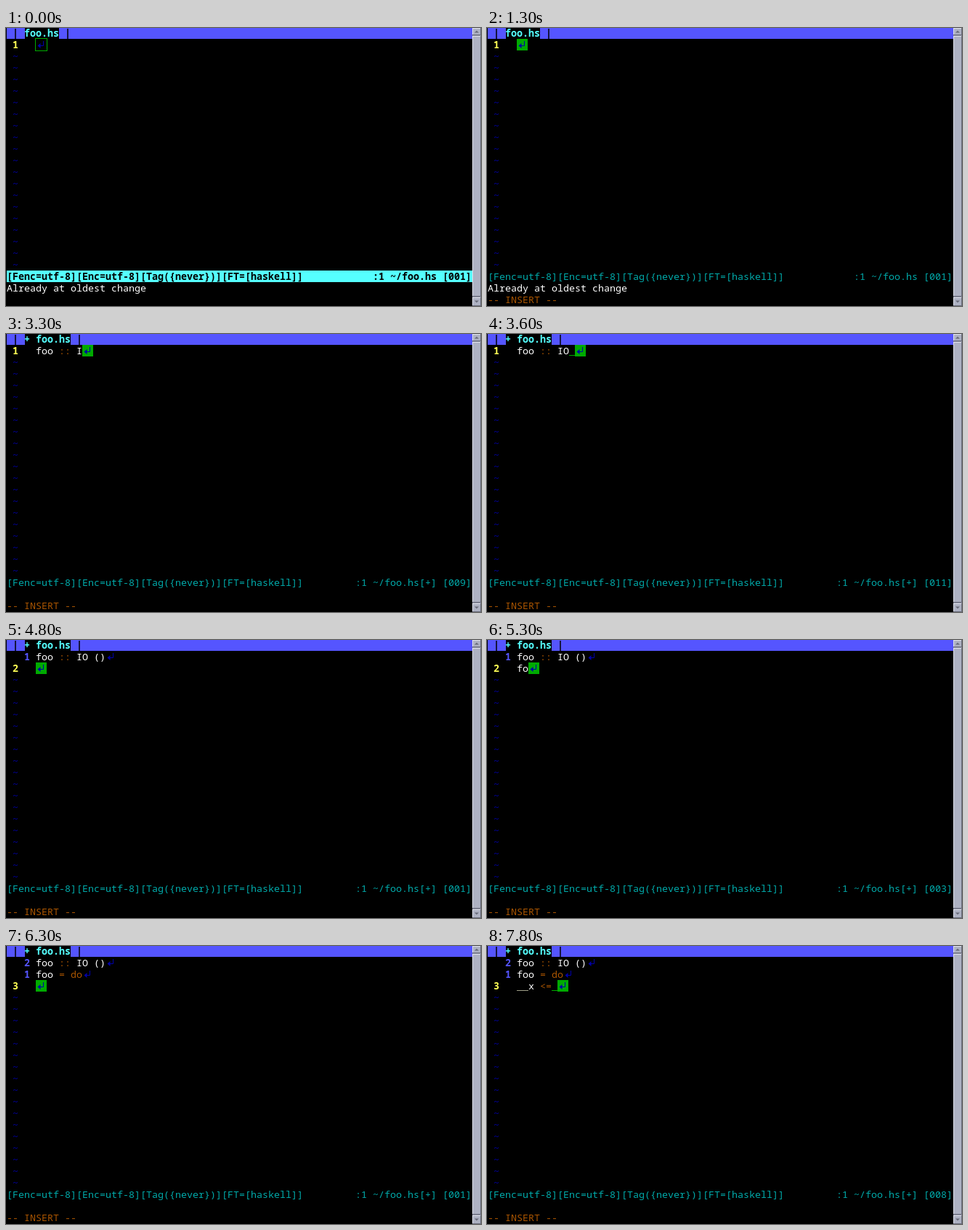
Write an HTML page with a canvas that moves like this. It is 654 px wide and 384 px high and loops after 8 s.

```html
<!DOCTYPE html>
<html lang="en">
<head>
<meta charset="utf-8">
<title>Editor session</title>
<style>
html, body { margin: 0; width: 100%; height: 100%; overflow: hidden; background: #000; }
canvas { display: block; }
</style>
</head>
<body>
<canvas id="stage" width="654" height="384"></canvas>
<script>
const ctx = document.getElementById('stage').getContext('2d');
const LOOP = 8000, CW = 8, CH = 16, COLS = 80, TEXT_COL = 5;
const C = {
  white: '#ffffff', blue: '#5555ff', navy: '#0000aa', cyan: '#55ffff', teal: '#00aaaa',
  brown: '#aa5500', green: '#00aa00', yellow: '#ffff55', purple: '#aa00aa', indent: '#a0a088'
};
const POPUP = " filename_lower_camel [nsnip] `substitute(bufname('%') = ";
const INFO = '[Fenc=utf-8][Enc=utf-8][Tag({never})][FT=[haskell]]';

// Typing: time and the whole buffer from then on
const SIG = 'foo :: IO ()\n', BODY = SIG + 'foo = do\n';
const edits = [
  [0, ''], [1700, 'f'], [2200, 'fo'], [2400, 'foo'], [2700, 'foo '], [2900, 'foo :'],
  [3100, 'foo ::'], [3200, 'foo :: '], [3300, 'foo :: I'], [3500, 'foo :: IO'],
  [3600, 'foo :: IO '], [3800, 'foo :: IO ()'], [4200, SIG + '    '], [4800, SIG],
  [5100, SIG + 'f'], [5300, SIG + 'fo'], [5400, SIG + 'foo'], [5600, SIG + 'foo '],
  [5700, SIG + 'foo = '], [5900, SIG + 'foo = d'], [6000, SIG + 'foo = do'], [6300, BODY],
  [6500, BODY + '  '], [6900, BODY + '  x'], [7100, BODY + '  x '], [7200, BODY + '  x <'],
  [7600, BODY + '  x <='], [7800, BODY + '  x <= ']
];

const cellX = col => 1 + col * CW;
const cellY = row => row * CH - 1;

function rect(x, y, w, h, color) {
  ctx.fillStyle = color;
  ctx.fillRect(x, y, w, h);
}

function fillCells(col, row, n, color) {
  rect(cellX(col), cellY(row), n * CW, CH, color);
}

function put(str, col, row, color, bold) {
  ctx.font = (bold ? 'bold ' : '') + '13.33px "Noto Sans Mono", "DejaVu Sans Mono", monospace';
  ctx.fillStyle = color;
  [...str].forEach((ch, i) => {
    if (ch !== ' ') ctx.fillText(ch, cellX(col + i), cellY(row) + 13);
  });
}

function returnMark(col, row) {
  const x = cellX(col), y = cellY(row);
  ctx.strokeStyle = C.navy;
  ctx.lineWidth = 1;
  ctx.beginPath();
  ctx.moveTo(x + 10.5, y + 3);
  ctx.lineTo(x + 10.5, y + 9.5);
  ctx.lineTo(x + 4, y + 9.5);
  ctx.stroke();
  ctx.fillStyle = C.navy;
  ctx.beginPath();
  ctx.moveTo(x + 2.5, y + 9.5);
  ctx.lineTo(x + 6.5, y + 6);
  ctx.lineTo(x + 6.5, y + 13);
  ctx.fill();
}

function codeLine(str, row) {
  put(str, TEXT_COL, row, C.white);
  for (const m of str.matchAll(/[:=<]+|\bdo\b/g)) {
    fillCells(TEXT_COL + m.index, row, m[0].length, '#000');
    put(m[0], TEXT_COL + m.index, row, C.brown);
  }
  const underline = (start, n, color) =>
    rect(cellX(TEXT_COL + start), cellY(row) + 14, n * CW, 1, color);
  const body = str.trimEnd().length;
  const lead = body ? str.length - str.trimStart().length : 0;
  underline(0, lead, C.indent);
  underline(body, str.length - body, C.green);
}

function tabBar(modified) {
  const label = modified ? '+ foo.hs' : 'foo.hs';
  rect(1, 0, 641, 15, C.blue);
  rect(cellX(3) + 1, 0, label.length * CW - 1, 15, '#000');
  put('|', 1, 0, '#000', true);
  put(label, 3, 0, C.cyan, true);
  put('|', 4 + label.length, 0, '#000', true);
}

function statusLine(insert, modified, column) {
  const color = insert ? C.teal : '#000';
  const right = ':1 ~/foo.hs' + (modified ? '[+]' : '') + ' [' + String(column).padStart(3, '0') + ']';
  if (!insert) rect(1, cellY(21), 641, CH, C.cyan);
  put(INFO, 0, 21, color, !insert);
  put(right, COLS - right.length, 21, color, !insert);
}

function bevel(y, h) {
  rect(642, y, 12, h, '#6a6d7c');
  rect(642, y, 11, h - 1, '#dfe1ea');
  rect(643, y + 1, 10, h - 2, '#aeb2c3');
}

function arrow(y, dir) {
  ctx.fillStyle = '#686b79';
  ctx.beginPath();
  ctx.moveTo(648, y - 1.5 * dir);
  ctx.lineTo(645, y + 1.5 * dir);
  ctx.lineTo(651, y + 1.5 * dir);
  ctx.fill();
}

function scrollbar() {
  rect(642, 0, 12, 384, '#8c90a1');
  bevel(0, 10);
  bevel(11, 360);
  bevel(372, 12);
  arrow(5, 1);
  arrow(378, -1);
}

function draw(t) {
  const [, text] = edits.findLast(e => e[0] <= t);
  const lines = text.split('\n');
  const last = lines.length - 1;
  const insert = t >= 1300, modified = t >= 1700;

  rect(0, 0, 654, 384, '#000');
  tabBar(modified);

  lines.forEach((str, i) => {
    const row = i + 1, end = TEXT_COL + str.length;
    if (i === last) put(String(row), 1, row, C.yellow, true);
    else put(String(last - i), 3, row, C.blue, true);
    codeLine(str, row);
    if (i === last) {
      if (t >= 700) {
        rect(cellX(end), cellY(row), 2 * CW - 1, CH, C.green);
      } else {
        ctx.strokeStyle = C.green;
        ctx.lineWidth = 1;
        ctx.strokeRect(cellX(end) - 0.5, cellY(row) - 0.5, 16, 17);
      }
    }
    returnMark(end, row);
  });
  for (let row = lines.length + 1; row <= 20; row++) put('~', 1, row, C.navy);

  if (text === 'fo') {
    fillCells(4, 2, POPUP.length, C.blue);
    put(POPUP, 4, 2, C.purple, true);
  }

  statusLine(insert, modified, lines[last].length + 1);
  if (t < 2700) put('Already at oldest change', 0, 22, C.white);
  if (insert) put('-- INSERT --', 0, 23, C.brown);
  scrollbar();
}

function tick() {
  draw(performance.now() % LOOP);
  requestAnimationFrame(tick);
}
tick();
</script>
</body>
</html>
```
